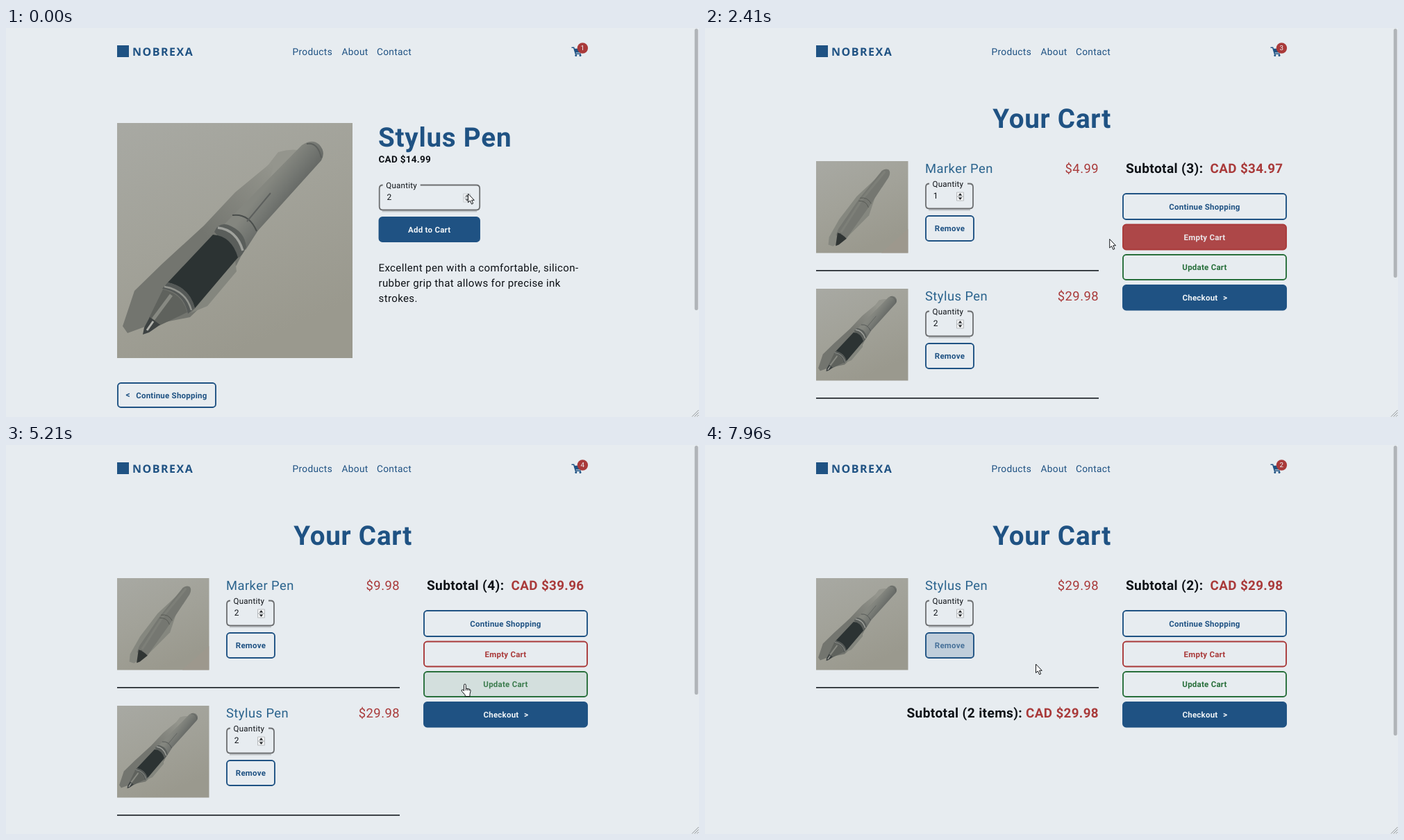
An HTML page for the animation above (8000 ms loop, 998 by 561 pixels).

```html
<!DOCTYPE html>
<html lang="en">
<head>
<meta charset="utf-8">
<title>Pen shop cart</title>
<style>
  html, body { margin: 0; width: 100%; height: 100%; overflow: hidden; background: #e7ecf0; }
  svg { display: block; width: 998px; height: 561px; }
  text { font-family: Rubik, Roboto, sans-serif; letter-spacing: .024em; text-rendering: geometricPrecision; white-space: pre; }
  .m { font-weight: 600; letter-spacing: .02em; }
  .mid { text-anchor: middle; }
  .end { text-anchor: end; }
  .logo { font: 700 16px "Noto Sans", sans-serif; letter-spacing: 1.5px; }
</style>
</head>
<body>
<svg id="stage" viewBox="0 0 998 561"></svg>
<script>
const BLUE = '#1f5283', RED = '#a93a3a', GREEN = '#286f3b', INK = '#0d1116', PALE = '#f0f4f7';
const LOOP = 8000, FADE = 230;

// Bursts of screen updates: start, end, number of steps
const bursts = [
  [150, 590, 9], [1050, 1050, 1], [1230, 1540, 7], [2110, 2890, 16], [2950, 3130, 3],
  [3350, 4140, 14], [4200, 4420, 5], [4980, 4980, 1], [5160, 5390, 6],
  [6100, 6810, 14], [7020, 7220, 5], [7710, 7960, 6]
];

// Pointer path: time, x, y
const path = [
  [0, 665, 239], [150, 665, 239], [330, 654, 272], [590, 646, 288], [2060, 646, 288],
  [2200, 628, 301], [2330, 600, 307], [2600, 480, 290], [2890, 368, 236], [3300, 368, 236],
  [3450, 392, 233], [3750, 520, 250], [3960, 605, 284], [4080, 642, 318], [4140, 650, 330],
  [4255, 655, 340], [4420, 661, 345], [6050, 661, 345], [6200, 600, 340], [6450, 460, 315],
  [6580, 386, 302], [6700, 361, 298], [7660, 361, 298], [7795, 390, 304], [7960, 476, 316]
];

// Times when the pointer enters and leaves each button
const hovers = {
  add: [[340, 1230]],
  empty: [[1290, 2330], [3960, 4108]],
  update: [[4160, 5160], [5160, 6200]],
  removeA: [[6580, 7020]],
  removeB: [[6985, 7795]]
};

const buttons = {};

function text(x, y, size, str, fill = INK, cls = '', id = '') {
  return `<text ${id && `id="${id}"`} class="${cls}" x="${x}" y="${y}" font-size="${size}" fill="${fill}">${str}</text>`;
}

function button(id, x, y, w, h, label, color, solid = false, labelX = x + w / 2) {
  buttons[id] = { color, solid };
  return `<g id="${id}"><rect x="${x + 1}" y="${y + 1}" width="${w - 2}" height="${h - 2}" rx="4.5"
    fill="${color}" fill-opacity="${+solid}" stroke="${color}" stroke-width="1.9"/>
    ${text(labelX, y + h / 2 + 4, 11.5, label, solid ? PALE : color, 'm mid')}</g>`;
}

function spinner(id, x, y) {
  return `<g id="${id}" transform="translate(${x} ${y})">
    <path d="M.5 .5h10v6h-10zM.5 6.5h10v6h-10z" fill="#f1f2f3" stroke="#b9bdc0"/>
    <path d="M5.5 1.8l2.7 3.2h-5.4zM5.5 11.2l2.7-3.2h-5.4z" fill="#16191c"/></g>`;
}

function quantity(id, x, y, w, gap, value) {
  const h = 36, r = 5;
  return `<path d="M${x + 4} ${y + h + 2}h${w - 8}" stroke="#000" stroke-opacity=".16" stroke-width="2"/>
    <path d="M${x + gap} ${y}H${x + w - r}q${r} 0 ${r} ${r}v${h - 2 * r}q0 ${r} ${-r} ${r}h${2 * r - w}
      q${-r} 0 ${-r} ${-r}v${2 * r - h}q0 ${-r} ${r} ${-r}" fill="none" stroke="#6c6e70" stroke-width="1.8"/>
    ${text(x + 9.5, y + 4.4, 11.5, 'Quantity')}
    ${text(x + 10.8, y + 21.4, 12, value, INK, '', id + 'Value')}
    ${spinner(id + 'Spin', x + w - 24, y + 12)}`;
}

function item(key, name, photo) {
  return `<use href="#${photo}" transform="translate(160 192) scale(${132.5 / 339})"/>
    ${text(317, 209, 18.4, name, '#2a638d')}
    ${text(567, 209, 18.4, '$29.98', RED, 'end', 'price' + key)}
    ${quantity('qty' + key, 318, 224.5, 68, 60, 2)}
    ${button('remove' + key, 317, 270, 71, 38, 'Remove', BLUE)}
    <rect x="160" y="349" width="407" height="1.7" fill="#20262b"/>`;
}

function focusRing(id, x, y, w, h, color) {
  return `<rect id="${id}" x="${x + .5}" y="${y + .5}" width="${w - 1}" height="${h - 1}" fill="none"
    stroke="${color}" stroke-dasharray="1 1" stroke-opacity=".8"/>`;
}

const defs = `<defs>
  <linearGradient id="paper" x2=".45" y2="1">
    <stop offset="0" stop-color="#a8a9a3"/><stop offset=".5" stop-color="#a2a299"/><stop offset="1" stop-color="#9a998e"/>
  </linearGradient>
  <linearGradient id="barrel" gradientUnits="userSpaceOnUse" x1="212" y1="95" x2="246" y2="122">
    <stop offset="0" stop-color="#84867f"/><stop offset=".45" stop-color="#757873"/><stop offset="1" stop-color="#626562"/>
  </linearGradient>
  <linearGradient id="shade" gradientUnits="userSpaceOnUse" x1="225" y1="60" x2="130" y2="165">
    <stop offset="0" stop-color="#94958d"/><stop offset="1" stop-color="#73756f"/>
  </linearGradient>
  <g id="stylus">
    <path d="M0 0H339V339H0z" fill="url(#paper)"/>
    <path d="M232 42Q250 36 268 40L188 170 158 200 140 160z" fill="#94958d"/>
    <path d="M228 52L170 100 125 148 65 203 25 242 8 293 15 303 45 292 105 280 155 232 172 205 205 140z" fill="url(#shade)"/>
    <path d="M112 268l58-70 2 16-42 50-24 10z" fill="#84867e"/>
    <path d="M266 32Q281 22 291 31 301 42 294 54L203 155 185 183 150 151 166 134z" fill="url(#barrel)"/>
    <path d="M273 30Q289 27 294 50" fill="none" stroke="#5d605d" stroke-width="2"/>
    <path d="M166 133Q190 130 201 156" fill="none" stroke="#4a4e4c" stroke-width="2"/>
    <path d="M221 101l-34 41" stroke="#5c5f5d" stroke-width="2"/>
    <path d="M140 157Q146 143 160 147 184 156 186 179 180 193 173 195z" fill="#5a5e5b"/>
    <path d="M145 151Q172 154 181 184" fill="none" stroke="#a0a29d" stroke-width="3.5"/>
    <path d="M138 161Q165 163 174 194L112 267Q104 237 73 230z" fill="#2c3333"/>
    <path d="M73 230Q104 236 112 267L102 275Q96 244 65 239z" fill="#555957"/>
    <path d="M68 236Q99 241 107 270" fill="none" stroke="#92948e" stroke-width="2.5"/>
    <path d="M66 240Q94 246 101 273L61 292 46 281z" fill="#5f625d"/>
    <path d="M78 248L52 283" stroke="#878982" stroke-width="5"/>
    <path d="M47 280L62 291 46 302 37 305 39 295z" fill="#3d4242"/>
    <path d="M52 286l-9 13" stroke="#b2b3ad" stroke-width="3"/>
  </g>
  <g id="marker">
    <path d="M0 0H339V339H0z" fill="url(#paper)"/>
    <path d="M339 250V339H240z" fill="#a0988c" opacity=".6"/>
    <path d="M244 42L150 130 85 215 48 280 45 308 62 314 110 285 195 200 215 140z" fill="#85877f"/>
    <path d="M242 36Q254 25 268 32 276 43 267 60L203 157 110 288 73 274 82 250 158 140z" fill="#757771"/>
    <path d="M254 38L170 140 92 262" fill="none" stroke="#7d7f78" stroke-width="8"/>
    <path d="M162 136Q190 132 203 157M157 147Q184 145 193 171" fill="none" stroke="#555953" stroke-width="2.5"/>
    <path d="M79 264Q96 268 112 286L84 308 72 313z" fill="#303534"/>
  </g>
</defs>`;

const header = `
  <rect x="160" y="25" width="17" height="17" fill="${BLUE}"/>
  <text class="logo" x="182" y="39.6" fill="${BLUE}">NOBREXA</text>
  ${text(412.5, 39, 13.7, 'Products', BLUE)}${text(483.5, 39, 13.7, 'About', BLUE)}${text(534, 39, 13.7, 'Contact', BLUE)}
  <path d="M814.5 28.2h3.2l2.6 9h7.6" fill="none" stroke="${BLUE}" stroke-width="1.5"/>
  <path d="M818 29.8h11.5l-1.4 5.8h-8.4z" fill="${BLUE}"/>
  <circle cx="820.8" cy="39.6" r="1.5" fill="${BLUE}"/><circle cx="827" cy="39.6" r="1.5" fill="${BLUE}"/>
  <circle cx="830.4" cy="29" r="7.7" fill="${RED}"/>
  ${text(830.4, 32.4, 9.8, '1', PALE, 'mid', 'badge')}`;

const product = `<g id="product">
  <use href="#stylus" x="160" y="137"/>
  ${text(536, 171.2, 38.6, 'Stylus Pen', BLUE, 'm')}
  ${text(536.5, 194, 13.5, 'CAD $14.99', INK, 'm')}
  ${quantity('qtyP', 537.7, 226.5, 144.5, 59, 2)}
  ${button('add', 536.5, 272, 146.5, 37, 'Add to Cart', BLUE, true)}
  ${focusRing('focusAdd', 548, 284, 123, 14, BLUE)}
  ${['Excellent pen with a comfortable, silicon-', 'rubber grip that allows for precise ink', 'strokes.']
    .map((line, i) => text(536.5, 350.7 + i * 22, 15.05, line)).join('')}
  ${button('back', 160, 511, 143, 37, 'Continue Shopping', BLUE, false, 238.3)}
  ${text(172.5, 533, 12, '&lt;', BLUE, 'm')}
</g>`;

const cart = `<g id="cart">
  ${text(499.6, 143.7, 38.6, 'Your Cart', BLUE, 'm mid')}
  <g id="itemA">${item('A', 'Marker Pen', 'marker')}${focusRing('focusRemove', 330, 281, 46, 15, PALE)}</g>
  <g id="itemB">${item('B', 'Stylus Pen', 'stylus')}</g>
  <g id="footer">
    ${text(290.5, 392.8, 19.1, 'Subtotal (2 items):', INK, 'm')}
    ${text(567, 392.8, 18.8, 'CAD $29.98', RED, 'm end')}
  </g>
  ${text(606, 209, 19.1, '', INK, 'm', 'count')}
  ${text(832.5, 209, 18.8, '', RED, 'm end', 'total')}
  ${button('shop', 601, 238, 237, 39, 'Continue Shopping', BLUE)}
  ${button('empty', 601, 282.5, 237, 38, 'Empty Cart', RED)}
  ${button('update', 601, 326, 237, 38, 'Update Cart', GREEN)}
  ${button('checkout', 601, 370, 237, 37.5, 'Checkout', BLUE, true, 713)}
  ${text(746, 392.8, 12, '&gt;', PALE, 'm')}
  ${focusRing('focusUpdate', 613, 338, 214, 14, PALE)}
</g>`;

const chrome = `
  <rect id="scroll" x="991.7" y="1" width="5" height="406" rx="2.5" fill="#b0b4b8"/>
  <path d="M988 560.5l9.5-9.5M991.5 560.5l6-6M995 560.5l2.5-2.5" stroke="#8d9296" stroke-width="1"/>
  <g id="pointer" fill="#fff" stroke="#15181b" stroke-linejoin="round">
    <path id="arrow" d="M.5 0V12.6L3.3 10l2.3 5 2.1-1-2.2-4.7h3.8z"/>
    <path id="hand" d="M-1.5 9V1.3a1.4 1.4 0 0 1 2.8 0V6l5 1.1q2 .5 1.8 2.6l-1.1 4.6v3.2h-6.8v-2l-4.7-5.3q-1.2-2 .6-2.4 1.2 0 2.4 1.8z
      M1.3 6v3M3.8 6.8v2.4M6.2 7.3v2"/>
  </g>`;

const stage = document.getElementById('stage');
stage.innerHTML = defs + header + product + cart + chrome;
const $ = id => document.getElementById(id);
const show = (id, on) => $(id).setAttribute('visibility', on ? 'inherit' : 'hidden');
const write = (id, str) => { if ($(id).textContent !== str) $(id).textContent = str; };
const ease = p => { p = Math.max(0, Math.min(1, p)); return p * p * (3 - 2 * p); };

function snap(t) {
  let now = 0;
  for (const [start, end, count] of bursts) {
    if (t < start) break;
    const step = (end - start) / Math.max(1, count - 1);
    now = step ? start + step * Math.min(count - 1, Math.floor((t - start) / step + 1e-6)) : start;
  }
  return now;
}

function pointerAt(t) {
  const i = path.findIndex(p => p[0] > t);
  if (i < 0) return path[path.length - 1].slice(1);
  const [t0, x0, y0] = path[i - 1], [t1, x1, y1] = path[i];
  const p = (t - t0) / (t1 - t0);
  return [x0 + (x1 - x0) * p, y0 + (y1 - y0) * p];
}

function paintButton(id, amount) {
  const { color, solid } = buttons[id], fill = solid ? 1 - amount : amount;
  const [box, label] = $(id).children;
  box.setAttribute('fill-opacity', fill);
  label.style.fill = `color-mix(in srgb, ${PALE} ${fill * 100}%, ${color})`;
}

function draw(t) {
  const inCart = t >= 1230, updated = t >= 5160, removed = t >= 7020;
  show('product', !inCart);
  show('cart', inCart);
  show('itemA', inCart && !removed);
  show('footer', removed);
  $('itemB').setAttribute('transform', `translate(0 ${removed ? 0 : 184})`);
  $('scroll').setAttribute('height', removed ? 418 : inCart ? 359 : 406);

  const count = removed ? '2' : updated ? '4' : '3';
  write('badge', inCart ? count : '1');
  write('count', `Subtotal (${count}):`);
  write('total', 'CAD $' + (removed ? '29.98' : updated ? '39.96' : '34.97'));
  write('qtyAValue', t >= 2950 ? '2' : '1');
  write('priceA', updated ? '$9.98' : '$4.99');

  show('focusAdd', t >= 1050 && !inCart);
  show('focusUpdate', t >= 4980 && !updated);
  show('focusRemove', t >= 6810 && !removed);
  $('qtyPSpin').setAttribute('opacity', t < 200 ? .6 : 1);
  $('qtyASpin').setAttribute('opacity', t > 2830 && t < 3400 ? .45 : 1);

  let hand = false;
  for (const id in hovers) {
    const span = hovers[id].filter(([enter]) => enter <= t).pop();
    if (!span) { paintButton(id, 0); continue; }
    const [enter, leave] = span;
    paintButton(id, ease((t - enter) / FADE) * (1 - ease((t - leave) / FADE)));
    hand = hand || t < leave;
  }
  show('hand', hand);
  show('arrow', !hand);
  const [x, y] = pointerAt(t);
  $('pointer').setAttribute('transform', `translate(${x} ${y})`);
}

const begin = performance.now();
function tick() {
  draw(snap((performance.now() - begin) % LOOP));
  requestAnimationFrame(tick);
}
tick();
</script>
</body>
</html>
```
